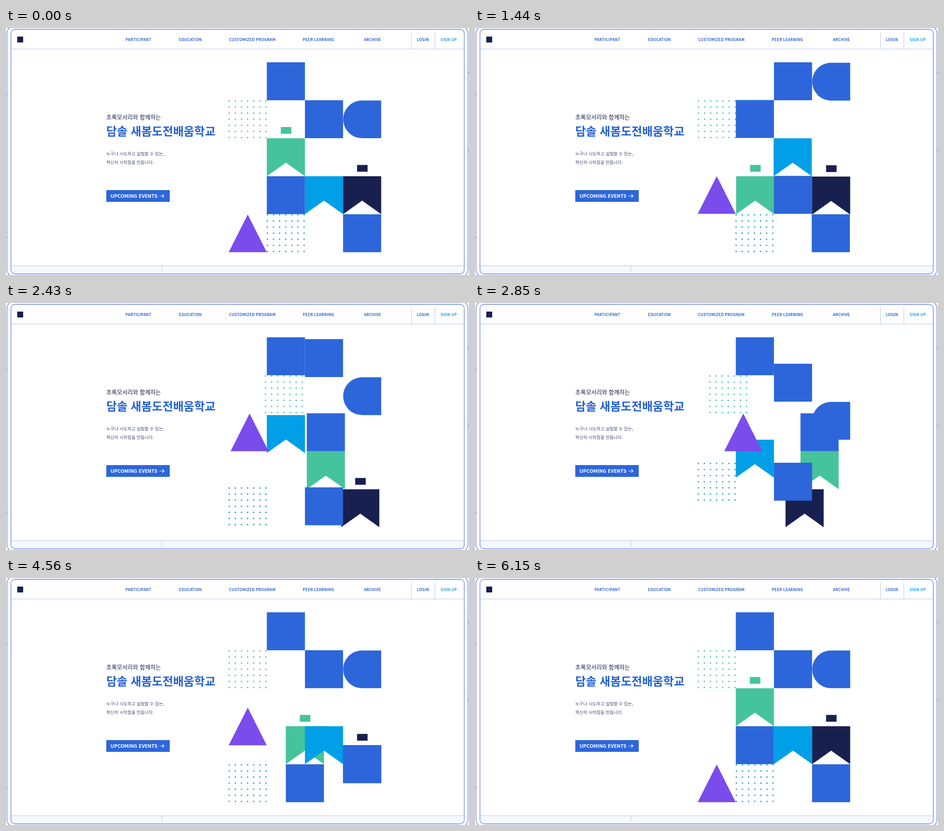
Animation, 1025 px wide and 547 px high, one loop 6.18 s. Source, as an HTML page:

```html
<!DOCTYPE html>
<html lang="ko">
<head>
<meta charset="utf-8">
<style>
  html, body { margin: 0; width: 100%; height: 100%; overflow: hidden; background: #fff; }
  svg { display: block; width: 1025px; height: 547px; }
  text { font-family: "Noto Sans CJK KR", "Noto Sans CJK", "Noto Sans", sans-serif; }
  .nav { font-size: 8.3px; font-weight: 700; letter-spacing: .3px; fill: #2c60cc; }
  .note { font-size: 9.6px; font-weight: 300; fill: #454b72; }
</style>
</head>
<body>
<svg viewBox="0 0 1025 547">
  <rect x="11" y="526" width="1003" height="18" fill="#f7f8fc"/>
  <g fill="none" stroke="#5f7de0" stroke-width="1.3">
    <rect x="2.3" y="-4" width="1020.4" height="555" rx="16"/>
    <rect x="11" y="3" width="1003.5" height="541.5" rx="9"/>
    <path d="M0 147.5H3M0 463.5H3M1022 98.5H1025M1022 271.5H1025"/>
  </g>
  <path d="M11 46.5H1014M897.5 9V46M949.5 9V46M11 526.5H1014M345 527V540" fill="none" stroke="#b3c4ee"/>
  <rect x="25" y="19" width="13" height="13" fill="#18204f"/>
  <g class="nav">
    <text x="264.5" y="29">PARTICIPANT</text>
    <text x="383" y="29">EDUCATION</text>
    <text x="494" y="29">CUSTOMIZED PROGRAM</text>
    <text x="657" y="29">PEER LEARNING</text>
    <text x="792.5" y="29">ARCHIVE</text>
    <text x="909.5" y="29">LOGIN</text>
    <text x="962" y="29" fill="#1b9fe6">SIGN UP</text>
  </g>
  <text x="222" y="202" font-size="12.75" font-weight="500" fill="#18204f">초록모서리와 함께하는</text>
  <text x="222" y="238" font-size="25.5" font-weight="700" fill="#2360d5">담솔 새봄도전배움학교</text>
  <text class="note" x="222" y="282">누구나 시도하고 실험할 수 있는,</text>
  <text class="note" x="222" y="300.5">혁신의 시작점을 만듭니다.</text>
  <rect x="222" y="359" width="140.5" height="26" fill="#2c66da"/>
  <text x="231.3" y="376" font-size="10.9" font-weight="700" fill="#fff">UPCOMING EVENTS</text>
  <path d="M339.5 372H350M346 368.3L350 372L346 375.7" fill="none" stroke="#fff" stroke-width="1.2"/>
  <g id="stage"></g>
</svg>
<script>
const LOOP = 6180, START = 474, STEP = 908;
const CELL_X = 84.4, CELL_Y = 84.1;
const BLUE = '#2c66da', GREEN = '#45c39c', CYAN = '#009fe8', NAVY = '#18204f', PURPLE = '#7a4cec';

const square = 'M0 0H84.4V84H0Z';
const flag = 'M0 0H84.4V84L42.2 54L0 84Z';
const boxedFlag = flag + 'M31 -25H54.3V-10H31Z';
const triangle = 'M42.2 .5L84.2 84H0Z';
const bullet = 'M84.4 .3H42.2A42 41.8 0 0 0 42.2 84H84.4Z';

// A 7 x 7 field of round dots
let dots = '';
for (let i = 0; i < 49; i++) {
  const x = 1.2 + i % 7 * 13.55, y = 1.4 + Math.floor(i / 7) * 13.5;
  dots += `M${x - 1.6} ${y}a1.6 1.6 0 1 0 3.2 0a1.6 1.6 0 1 0 -3.2 0Z`;
}

// Each route lists grid cells as column and row, one per step; back to front
const pieces = [
  [boxedFlag, NAVY, '33 33 34 24 34 33 33'],
  [boxedFlag, GREEN, '12 13 23 33 23 13 12'],
  [flag, CYAN, '23 22 12 13 23 23 23'],
  [triangle, PURPLE, '04 03 02 12 02 03 04'],
  [dots, '#129fdc', '14 14 04 03 04 04 14'],
  [dots, '#35cb98', '01 01 11 01 01 01 01'],
  [square, BLUE, '10 11 10 10 10 10 10'],
  [square, BLUE, '21 20 20 21 21 21 21'],
  [square, BLUE, '13 23 22 32 33 34 34'],
  [square, BLUE, '34 34 24 23 24 14 13'],
  [bullet, BLUE, '31 30 31 32 31 31 31'],
].map(([d, fill, route]) => {
  const el = document.createElementNS('http://www.w3.org/2000/svg', 'path');
  el.setAttribute('d', d);
  el.setAttribute('fill', fill);
  document.getElementById('stage').append(el);
  return { el, cells: route.split(' ').map(c => [+c[0], +c[1]]) };
});

// cubic-bezier(.42, 0, .58, 1)
function ease(x) {
  let lo = 0, hi = 1;
  for (let i = 0; i < 24; i++) {
    const t = (lo + hi) / 2, u = 1 - t;
    if (1.26 * u * u * t + 1.74 * u * t * t + t * t * t < x) lo = t; else hi = t;
  }
  return lo * lo * (3 - 2 * lo);
}

function draw(now) {
  const pos = Math.min(6, Math.max(0, (now % LOOP - START) / STEP));
  const step = Math.min(5, Math.floor(pos)), k = ease(pos - step);
  for (const { el, cells } of pieces) {
    const [a, b] = [cells[step], cells[step + 1]];
    const x = 493 + CELL_X * (a[0] + (b[0] - a[0]) * k);
    const y = 76 + CELL_Y * (a[1] + (b[1] - a[1]) * k);
    el.setAttribute('transform', `translate(${x.toFixed(2)} ${y.toFixed(2)})`);
  }
  requestAnimationFrame(() => draw(performance.now()));
}
draw(0);
</script>
</body>
</html>
```
